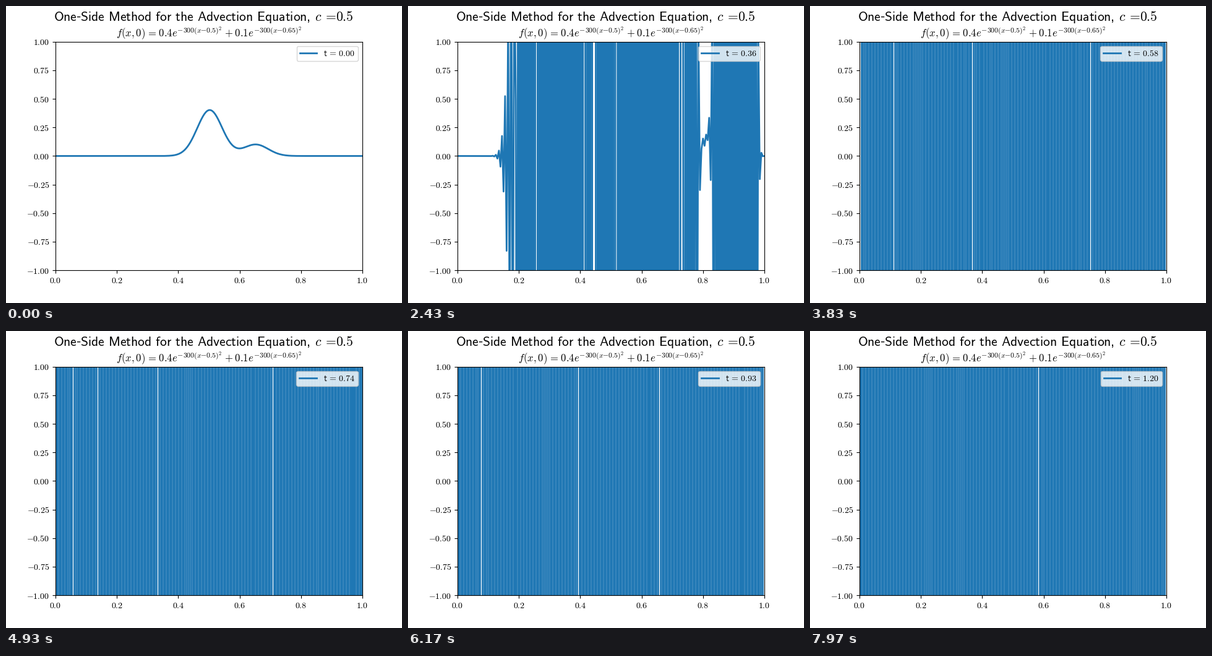
Write a matplotlib script that moves like this. It is 640 px wide and 480 px high and loops after 8010 ms.

```python
import numpy as np
import matplotlib.pyplot as plt
from matplotlib.animation import FuncAnimation

STEPS, LOOP_MS = 240, 8010
FRAMES = STEPS + 1  # the last state is held for one extra frame
C, DT, DX = 0.5, 0.005, 0.005

plt.rcParams["mathtext.fontset"] = "cm"


def space(em):
    return rf"\hspace{{{em}}}"


def sans(text):
    """Sans math text with text-style word spaces."""
    return space(0.38).join(rf"\mathsf{{{word}}}" for word in text.split())


def time_label(n):
    gap = space(0.16)
    return f"${sans('t')}{gap}={gap}{sans(f'{n * DT:.2f}')}$"


def solve(u, steps):
    """One-sided differences taken downwind: noise doubles every step."""
    states = []
    for _ in range(steps):
        u = u - C * DT / DX * (np.roll(u, -1) - u)
        states.append(u)
    return states


x = np.linspace(0, 1, 201)
start = 0.4 * np.exp(-300 * (x - 0.5) ** 2) + 0.1 * np.exp(-300 * (x - 0.65) ** 2)
states = solve(start, STEPS)

fig, ax = plt.subplots(figsize=(6.4, 4.8), dpi=100)
fig.text(
    0.4995, 0.95,
    f"${sans('One')}$-${sans('Side Method for the Advection Equation')}$,"
    f"${space(0.42)}c{space(0.18)}={space(-0.2)}{sans('0.5')}$",
    fontsize=15.5, family="Liberation Sans", ha="center", va="baseline",
)

eq = space(0.12) + "=" + space(0.12)
plus = space(0.05) + "+" + space(0.05)
ax.set_title(
    rf"$f(x,0){eq}0.4e^{{-300(x{{-}}0.5)^2}}{plus}0.1e^{{-300(x{{-}}0.65)^2}}$",
    fontsize=12, y=1 + 8 / 369.6, pad=0, va="baseline",
)

ax.set(xlim=(0, 1), ylim=(-1, 1))
xticks = np.arange(6) / 5
yticks = np.arange(-4, 5) / 4
ax.set_xticks(xticks, [f"${v:.1f}$" for v in xticks])
ax.set_yticks(yticks, [f"${v:.2f}$" for v in yticks])

line, = ax.plot(x, states[0], lw=2, color="C0", label=time_label(0))
label = ax.legend(loc="upper right", borderpad=0.36).get_texts()[0]


def update(frame):
    n = min(frame, STEPS - 1)
    line.set_ydata(states[n])
    label.set_text(time_label(n))
    return line, label


anim = FuncAnimation(fig, update, frames=FRAMES, interval=LOOP_MS / FRAMES,
                     repeat=True, repeat_delay=0)
plt.show()
```
